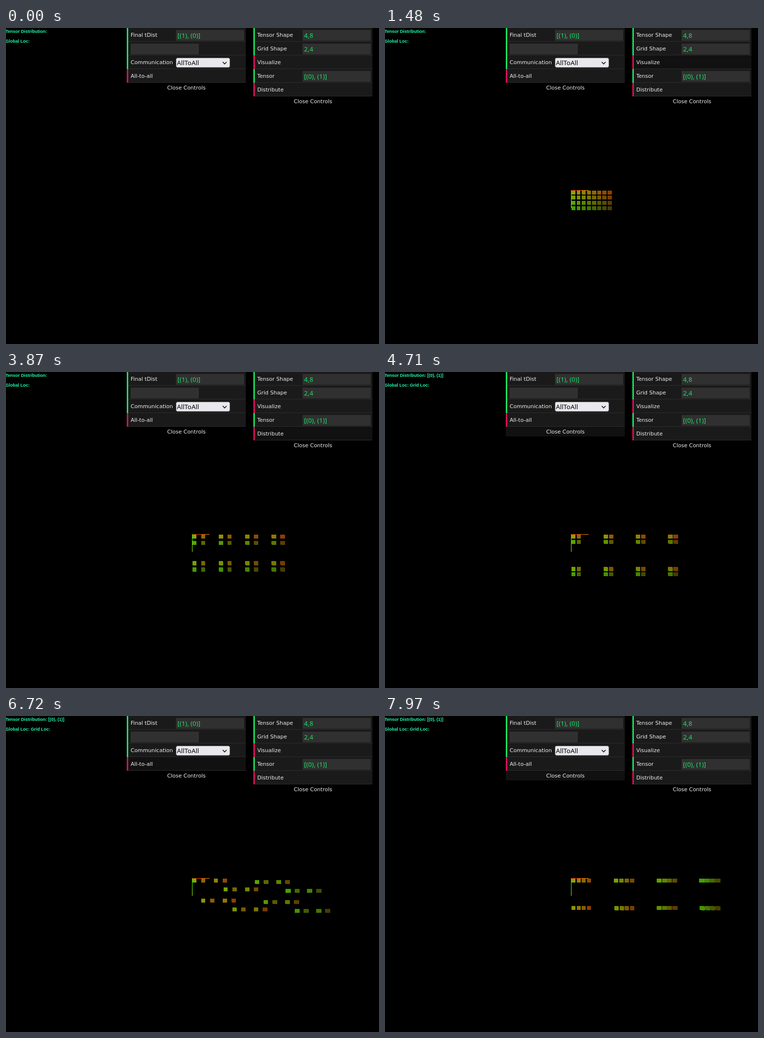
Write an HTML page that moves like this. It is 766 by 647 pixels and loops after 8000 ms.

```html
<!DOCTYPE html>
<html lang="en">
<head>
<meta charset="utf-8">
<style>
html, body { margin: 0; width: 100%; height: 100%; overflow: hidden; background: #000; }
svg { display: block; }
text { white-space: pre; }
.label { font: 11px "DejaVu Sans", sans-serif; fill: #eee; }
.value { font: 13.33px "Noto Sans", sans-serif; fill: #1edf66; }
.option { font: 13.33px "Noto Sans", sans-serif; fill: #000; }
.status { font: bold 9px "Liberation Sans", Arial, sans-serif; fill: #20ffb0; }
</style>
</head>
<body>
<svg id="stage" width="766" height="647" viewBox="0 0 766 647">
  <defs>
    <linearGradient id="axisX"><stop stop-color="#f00"/><stop offset="1" stop-color="#ffa000"/></linearGradient>
    <linearGradient id="axisY" x2="0" y2="1"><stop stop-color="#0f0"/><stop offset="1" stop-color="#b4ff00"/></linearGradient>
  </defs>
</svg>
<script>
const LOOP = 8000;
const ROW = 28, PANEL = 244.5;
const IDLE = '#1a1a1a', HOVER = '#111', GREEN = '#1edf5f', RED = '#dc1058';
const stage = document.getElementById('stage');

function add(parent, tag, attrs, text = '') {
  const el = document.createElementNS('http://www.w3.org/2000/svg', tag);
  for (const key in attrs) el.setAttribute(key, attrs[key]);
  el.textContent = text;
  return parent.appendChild(el);
}
const rect = (x, y, width, height, fill, extra) =>
  add(stage, 'rect', { x, y, width, height, fill, ...extra });
const write = (x, y, kind, text) => add(stage, 'text', { x, y, class: kind }, text);

// Control panels; the returned map gives each row's background by name
function panel(x, rows) {
  const backs = {};
  rows.forEach(([label, value, isButton], i) => {
    const y = i * ROW;
    backs[label] = rect(x, y, PANEL, ROW - 1, IDLE);
    rect(x, y + ROW - 1, PANEL, 1, '#2c2c2c');
    rect(x, y, 3, ROW, isButton ? RED : GREEN);
    write(x + 8, y + 18, 'label', label);
    if (value !== null) {
      rect(x + (label ? 101 : 8), y + 4, 140, 22, '#303030');
      write(x + 104, y + 20, 'value', value);
    }
  });
  const bottom = rows.length * ROW;
  backs.close = rect(x, bottom, PANEL, 20, '#000');
  write(x + 83, bottom + 14, 'label', 'Close Controls');
  return backs;
}

const left = panel(248, [
  ['Final tDist', '[(1), (0)]'],
  ['', ''],
  ['Communication', null],
  ['All-to-all', null, true],
]);
const right = panel(508, [
  ['Tensor Shape', '4,8'],
  ['Grid Shape', '2,4'],
  ['Visualize', null, true],
  ['Tensor', '[(0), (1)]'],
  ['Distribute', null, true],
]);
rect(349.5, 61.5, 110, 19, '#e9e9ed', { rx: 3, stroke: '#8f8f9d' });
write(351, 76, 'option', 'AllToAll');
add(stage, 'path', { d: 'M445 69.5l4 4 4-4', fill: 'none', stroke: '#111', 'stroke-width': 1.6 });

const distributionText = write(-1, 10, 'status', '');
const locationText = write(-1, 30, 'status', '');

// Pointer hovers: element, time spans, resting colour
const hovers = [
  [right.close, [[600, 660]], '#000'],
  [right.Distribute, [[660, 740], [2250, 4150]], IDLE],
  [right.Visualize, [[740, 1950]], IDLE],
  [left.close, [[4600, 4850], [7700, LOOP]], '#000'],
  [left['All-to-all'], [[4850, 7600]], IDLE],
];

// Tensor cells, with three layouts each
const PITCH = 10.7, GAP = 46.1, SIZE = 7.7, BACK = 0.987;
const CENTER = { x: 383, y: 323.5 };
const ORIGIN = { x: 383, y: 333 };
const tensor = add(stage, 'g', { 'shape-rendering': 'crispEdges' });
const cells = [];
for (let i = 0; i < 4; i++) {
  for (let j = 0; j < 8; j++) {
    cells.push({
      el: add(tensor, 'polygon', { fill: `rgb(${144 - 25 * i},${162 - 14.5 * j},0)` }),
      global: [j * PITCH, i * PITCH],
      spread: [
        (j % 4) * (2 * PITCH + GAP) + (j >> 2) * PITCH,
        (i % 2) * (2 * PITCH + GAP) + (i >> 1) * PITCH,
      ],
      swapped: [i * (4 * PITCH + GAP) + (j >> 1) * PITCH, (j % 2) * (PITCH + GAP)],
    });
  }
}
add(tensor, 'rect', { x: 382, y: 332, width: 36, height: 1, fill: 'url(#axisX)' });
add(tensor, 'rect', { x: 382, y: 332, width: 1, height: 36, fill: 'url(#axisY)' });

const easeOut = (t, start) => {
  const u = (t - start) / 2000;
  return u <= 0 ? 0 : u >= 1 ? 1 : 1 - 2 ** (-10 * u);
};
const mix = (a, b, p) => a.map((v, k) => v + (b[k] - v) * p);

// Outline of a cube seen from the centre: front face joined to the smaller back face
function outline([dx, dy]) {
  const x = ORIGIN.x + dx, y = ORIGIN.y + dy, r = x + SIZE, b = y + SIZE;
  const bx = v => CENTER.x + (v - CENTER.x) * BACK;
  const by = v => CENTER.y + (v - CENTER.y) * BACK;
  return [bx(x), by(y), bx(r), by(y), r, y, r, b, x, b, bx(x), by(b)]
    .map(v => v.toFixed(2)).join(' ');
}

function draw(t) {
  for (const [el, spans, idle] of hovers) {
    const on = spans.some(([from, to]) => t >= from && t < to);
    el.setAttribute('fill', on ? HOVER : idle);
  }
  distributionText.textContent = 'Tensor Distribution:' + (t >= 4400 ? ' [(0), (1)]' : '');
  locationText.textContent = 'Global Loc:' + (t >= 4100 ? ' Grid Loc:' : '');

  tensor.setAttribute('visibility', t >= 1480 ? 'visible' : 'hidden');
  const distribute = t < 3455 ? 0 : easeOut(t, 3438);
  const exchange = t < 6385 ? 0 : easeOut(t, 6346);
  for (const { el, global, spread, swapped } of cells) {
    const place = mix(mix(global, spread, distribute), swapped, exchange);
    el.setAttribute('points', outline(place));
  }
}

function tick() {
  draw(performance.now() % LOOP);
  requestAnimationFrame(tick);
}
tick();
</script>
</body>
</html>
```
